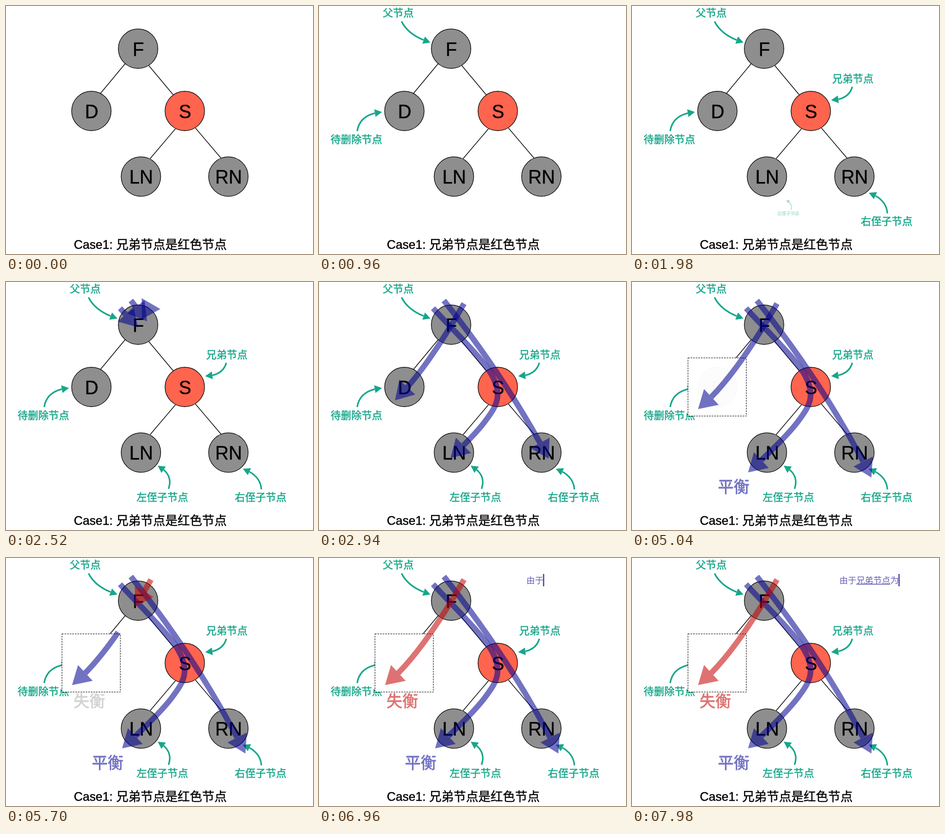
These frames come from a looping animation (595x482 px, 8000 ms). An HTML page:

```html
<!DOCTYPE html>
<html lang="zh-CN">
<head>
<meta charset="utf-8">
<title>Case1</title>
<style>
  html, body { margin: 0; width: 100%; height: 100%; overflow: hidden; background: #fff; }
  svg { display: block; width: 100vw; height: 100vh; }
  text { font-family: "Liberation Sans", "Noto Sans CJK SC", "Noto Sans CJK", sans-serif; }
  .edge { stroke: #000; stroke-width: 1.3; }
  .node circle { stroke: #000; stroke-width: 1.2; }
  .node text { font-size: 36px; text-anchor: middle; stroke: #000; stroke-width: .4; }
  .caption { font-size: 23.8px; stroke: #000; stroke-width: .4; }
  .label { fill: #16a68a; font-size: 20px; }
  .label text { stroke: #16a68a; stroke-width: .5; }
  .label path { stroke: #16a68a; }
  .flow { opacity: .55; }
  .blue { fill: #000091; }
  .blue path { stroke: #000091; }
  .red { fill: #c40000; }
  .red path { stroke: #c40000; }
  .state { font-size: 30.5px; fill: currentColor; stroke: currentColor; stroke-width: .8; }
  .typed { font-size: 16.45px; fill: #6660b4; }
  .linked { text-decoration: underline; text-decoration-thickness: 1px; text-underline-offset: 4px; }
</style>
</head>
<body>
<svg id="stage" viewBox="0 0 595 482">
  <defs>
    <mask id="reveal" maskUnits="userSpaceOnUse" x="0" y="0" width="595" height="482">
      <path id="revealPath" d="M108 147.5H221.5V260.5H108.5V147" fill="none" stroke="#fff" stroke-width="6"/>
    </mask>
  </defs>
  <g id="edges"></g>
  <g id="nodes"></g>
  <text class="caption" x="131.5" y="471.5">Case1: 兄弟节点是红色节点</text>
  <g id="labels"></g>
  <rect id="cover" x="108.5" y="147.5" width="113" height="113" fill="#fff"/>
  <path d="M108.5 147.5H221.5V260.5H108.5Z" fill="none" stroke="#000" stroke-dasharray="3 2" mask="url(#reveal)"/>
  <g id="flows"></g>
  <text id="balanced" class="state" x="166.500" y="409" color="#7373c3">平衡</text>
  <text id="unbalanced" class="state" x="131" y="289">失衡</text>
  <text class="typed" x="402" y="49"><tspan id="head"></tspan><tspan id="link" class="linked"></tspan><tspan id="tail"></tspan></text>
  <rect id="caret" y="31" width="2.4" height="24" fill="#4a46a4"/>
</svg>
<script>
const LOOP = 8000;
const $ = id => document.getElementById(id);

function add(parent, tag, attrs = {}, text = '') {
  const el = document.createElementNS('http://www.w3.org/2000/svg', tag);
  for (const key in attrs) el.setAttribute(key, attrs[key]);
  el.textContent = text;
  parent.appendChild(el);
  return el;
}

const clamp = x => Math.min(1, Math.max(0, x));
const span = (t, start, length) => clamp((t - start) / length);
const smooth = x => (1 - Math.cos(Math.PI * x)) / 2;
const popOut = x => 1 + 2.4 * (x - 1) ** 3 + 1.4 * (x - 1) ** 2;

// An arrow along a curve; the returned function shows the part between two fractions.
function makeArrow(parent, d, width, headLength, headHalf) {
  const line = add(parent, 'path', { d, fill: 'none', 'stroke-width': width });
  const head = add(parent, 'polygon');
  const total = line.getTotalLength();
  return (from, to) => {
    const shown = to > 0 && from < 1;
    line.style.display = head.style.display = shown ? '' : 'none';
    if (!shown) return;
    const end = Math.max(headLength, to * total);
    const neck = end - headLength;
    const start = Math.min(from * total, neck);
    const body = neck - start;
    line.setAttribute('stroke-dasharray', `0 ${start} ${body} ${total * 2}`);
    if (body < .5) line.style.display = 'none';
    const tip = line.getPointAtLength(end);
    const base = line.getPointAtLength(neck);
    const size = Math.hypot(tip.x - base.x, tip.y - base.y);
    const nx = -(tip.y - base.y) / size * headHalf;
    const ny = (tip.x - base.x) / size * headHalf;
    head.setAttribute('points',
      `${tip.x},${tip.y} ${base.x + nx},${base.y + ny} ${base.x - nx},${base.y - ny}`);
  };
}

['M231 112L183 170', 'M276.5 115.5L324 172.5', 'M328.5 238.5L279 297', 'M367 237L417 296']
  .forEach(d => add($('edges'), 'path', { d, class: 'edge' }));

[['F', 256, 83], ['D', 165.5, 204], ['S', 346.5, 204, '#ff644e'], ['LN', 261.5, 331.5], ['RN', 431, 331.5]]
  .forEach(([name, cx, cy, fill = '#8e8e8e']) => {
    const node = add($('nodes'), 'g', { class: 'node' });
    add(node, 'circle', { cx, cy, r: 38.3, fill });
    add(node, 'text', { x: cx + .5, y: cy + 13.5 }, name);
  });

// text, x, baseline, pointer curve, centre of the pop
const labels = [
  ['父节点', 123.5, 21, 'M160 30Q174 58 216 71', 170, 38],
  ['待删除节点', 22.5, 267, 'M74 243Q79 210 122 206', 72, 236],
  ['兄弟节点', 388, 149, 'M427 157Q420 182 386 183', 428, 159],
  ['右侄子节点', 443.5, 426, 'M495 403Q493 375 459 363', 493, 395],
  ['左侄子节点', 253, 426, 'M315 402Q325 374 294 357', 303, 392]
].map(([text, x, y, d, cx, cy]) => {
  const group = add($('labels'), 'g', { class: 'label' });
  add(group, 'text', { x, y }, text);
  makeArrow(group, d, 3, 14, 7.5)(0, 1);
  return { group, cx, cy };
});

const flow = (color, d) =>
  makeArrow(add($('flows'), 'g', { class: `flow ${color}` }), d, 11, 35, 21);
const leftCurve = 'M281 42Q195 193 128 247';
const toDeleted = flow('blue', leftCurve);
const toLeft = flow('blue', 'M221 51C272 106 318 150 335 181C358 222 342 244 321 272Q296 305 225 370');
const toRight = flow('blue', 'M242 36Q375 203 464 380');
const broken = flow('red', leftCurve);

const message = '由于兄弟节点为';

function draw(t) {
  labels.forEach(({ group, cx, cy }, i) => {
    const p = span(t, 70 + 465 * i, 450);
    group.setAttribute('transform',
      `translate(${cx} ${cy}) scale(${popOut(p)}) translate(${-cx} ${-cy})`);
    group.style.opacity = clamp(p * 4);
  });

  const grow = smooth(span(t, 2350, 742));
  toDeleted(smooth(span(t, 5220, 1000)), grow);
  toLeft(0, grow);
  toRight(0, grow);
  broken(0, smooth(span(t, 5375, 1000)));

  $('balanced').style.opacity = span(t, 3240, 800);

  const box = smooth(span(t, 4150, 950));
  $('revealPath').setAttribute('stroke-dasharray', `${box * 453} 999`);
  $('revealPath').style.display = box ? '' : 'none';
  $('cover').style.opacity = span(box, .6, .4);

  const fade = span(t, 5400, 900);
  const tint = span(fade, .3, .5);
  $('unbalanced').style.opacity = fade;
  $('unbalanced').style.color =
    `rgb(${[222, 115, 113].map(c => Math.round(120 + (c - 120) * tint)).join()})`;

  const count = Math.min(message.length, Math.max(0, Math.floor((t - 6550) / 190)));
  const typed = message.slice(0, count);
  $('head').textContent = typed.slice(0, 2);
  $('link').textContent = typed.slice(2, 6);
  $('tail').textContent = typed.slice(6);
  $('caret').setAttribute('x', 401.2 + 16.45 * count);
  $('caret').style.display = count ? '' : 'none';
}

let origin;
function tick(now) {
  origin ??= now;
  draw((now - origin) % LOOP);
  requestAnimationFrame(tick);
}
draw(0);
requestAnimationFrame(tick);
</script>
</body>
</html>
```
